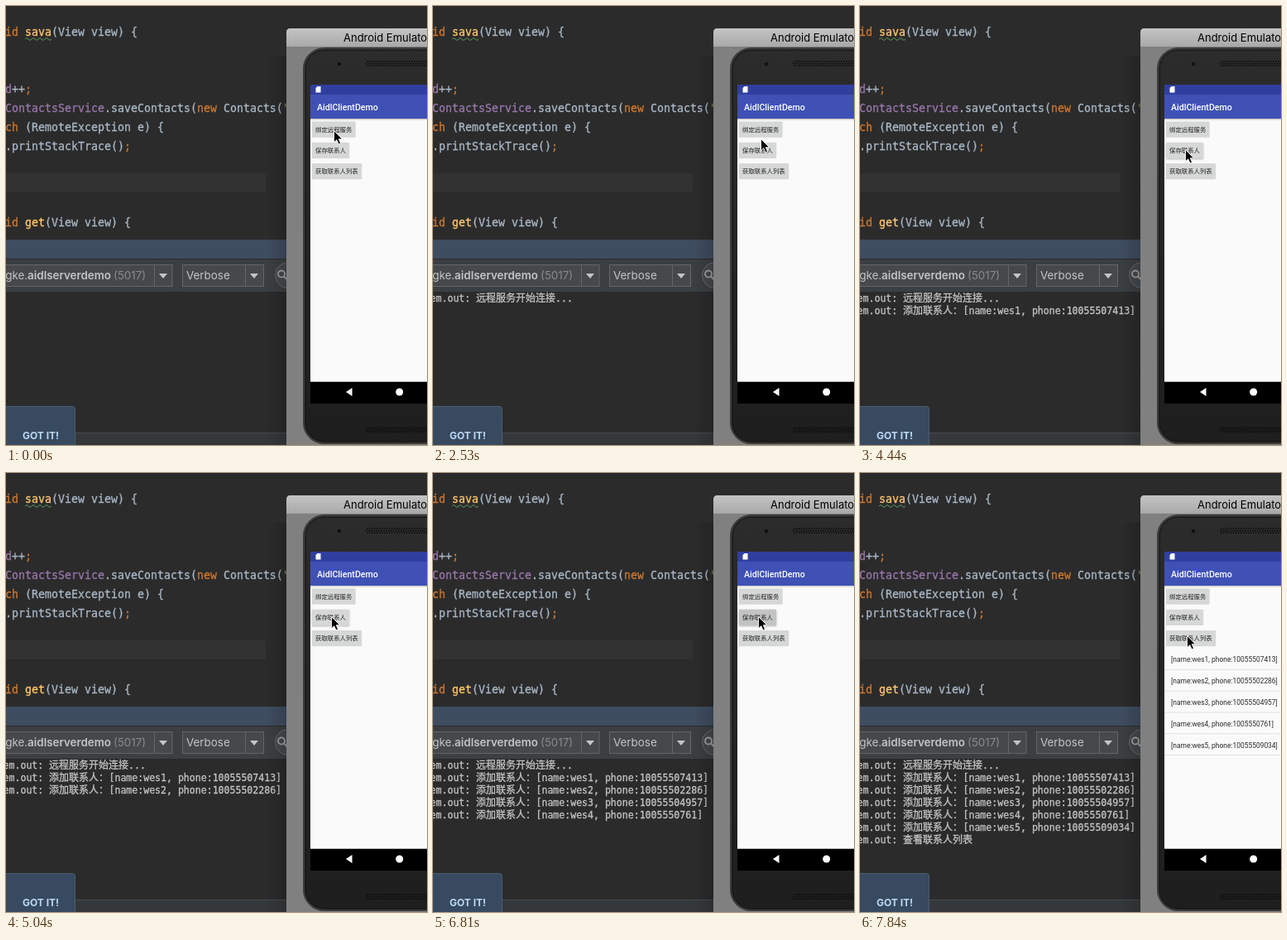
An HTML page for the animation above (8 s loop, 509 by 530 pixels).

```html
<!DOCTYPE html>
<html lang="zh">
<head>
<meta charset="utf-8">
<title>AIDL demo</title>
<style>
  html, body { margin: 0; width: 100%; height: 100%; overflow: hidden; background: #2b2b2b; }
  svg { display: block; width: 100%; height: 100%; }
  text { white-space: pre; }
  text, tspan { fill: currentColor; }
  .code, .log, .code tspan { stroke: currentColor; stroke-width: .3px; }
  .code { font: 13.29px "DejaVu Sans Mono", monospace; color: #a9b7c6; }
  .log { font: 11.55px "DejaVu Sans Mono", monospace; color: #c4c4c4; }
  .cjk { font: 12px "Noto Sans CJK SC", "Noto Sans CJK", sans-serif; }
  .ui { font: 13.4px Inter, sans-serif; color: #c4c4c4; }
  .package { font-weight: 600; }
  .app { font: 8.45px Roboto, sans-serif; color: #2a2a2a; }
  .button text { font: 500 7.4px "Noto Sans CJK SC", "Noto Sans CJK", sans-serif; color: #222; }
  .kw { color: #cc7832; }
  .fn { color: #ffc66d; }
  .field { color: #9876aa; }
  .string { color: #6a8759; }
  .box { fill: #45494b; stroke: #646769; }
</style>
</head>
<body>
<svg viewBox="0 0 509 530" preserveAspectRatio="none">
  <defs>
    <linearGradient id="titleBar" x2="0" y2="1">
      <stop stop-color="#c4c4c4"/><stop offset="1" stop-color="#a9a9a9"/>
    </linearGradient>
    <linearGradient id="phone" x2="0" y2="1">
      <stop stop-color="#2c2c2c"/><stop offset="1" stop-color="#1e1e1e"/>
    </linearGradient>
    <linearGradient id="shade">
      <stop stop-opacity="0"/><stop offset="1" stop-opacity=".16"/>
    </linearGradient>
    <filter id="lift" x="-20%" y="-40%" width="140%" height="190%">
      <feDropShadow dx="0" dy="1" stdDeviation="1.2" flood-opacity=".28"/>
    </filter>
  </defs>

  <!-- Editor -->
  <rect width="509" height="530" fill="#2b2b2b"/>
  <rect y="202" width="314" height="23" fill="#323232"/>
  <g class="code">
    <text x="-1" y="36"><tspan class="kw">id </tspan><tspan class="fn">sava</tspan>(View view) {</text>
    <text x="-1" y="105"><tspan class="field">d</tspan>++<tspan class="kw">;</tspan></text>
    <text x="-1" y="128"><tspan class="field">ContactsService</tspan>.saveContacts(<tspan class="kw">new</tspan> Contacts(<tspan class="string">"</tspan></text>
    <text x="-1" y="151"><tspan class="kw">ch</tspan> (RemoteException e) {</text>
    <text x="-1" y="174">.printStackTrace()<tspan class="kw">;</tspan></text>
    <text x="-1" y="266"><tspan class="kw">id </tspan><tspan class="fn">get</tspan>(View view) {</text>
  </g>
  <path d="M23 40q2 -3 4 0t4 0 4 0 4 0 4 0 4 0 4 0 4 0" fill="none" stroke="#5c9a5c"/>

  <!-- Log panel -->
  <rect y="282" width="340" height="23" fill="#3f4d60"/>
  <rect y="305" width="340" height="41" fill="#3c3f41"/>
  <path d="M0 281.5H340M0 305.5H340M0 345.5H340" stroke="#292b2d"/>
  <rect class="box" x="-5" y="312.5" width="206" height="26"/>
  <rect class="box" x="213.5" y="312.5" width="98" height="26"/>
  <path d="M179.5 313V338M289.5 313V338" stroke="#646769"/>
  <path d="M185 323h10l-5 6zM295 323h10l-5 6z" fill="#c4c4c4"/>
  <text class="ui" x="127" y="330" text-anchor="end">gke.<tspan class="package">aidlserverdemo</tspan></text>
  <text class="ui" x="130" y="330" style="color:#8a8a8a">(5017)</text>
  <text class="ui" x="218" y="330">Verbose</text>
  <rect class="box" x="325.5" y="309.5" width="60" height="31" rx="15.5"/>
  <circle cx="333" cy="323.5" r="4" fill="none" stroke="#a0a0a0" stroke-width="1.8"/>
  <path d="M336 326.5l4 4" stroke="#a0a0a0" stroke-width="2"/>
  <g id="log"></g>
  <rect y="515" width="340" height="15" fill="#35383a"/>
  <path d="M0 515.5H340" stroke="#484b4d"/>
  <rect x="-5" y="483.5" width="88.5" height="60" rx="3" fill="#374a5f" stroke="#4a5d70"/>
  <text x="20" y="523" style="font:700 12px Inter,sans-serif;color:#bcd9f6">GOT IT!</text>
  <rect x="314" y="60" width="25" height="470" fill="url(#shade)"/>

  <!-- Emulator window -->
  <path d="M339 530V32q0-5 5-5H509V530z" fill="#808080"/>
  <path d="M339 49V32q0-5 5-5H509V49z" fill="url(#titleBar)"/>
  <text x="408" y="43" style="font:13px Inter,sans-serif;color:#000">Android Emulator</text>
  <rect x="360" y="51" width="220" height="477" rx="25" fill="url(#phone)" stroke="#3c3c3c" stroke-width="2"/>
  <rect x="362.5" y="53.5" width="220" height="472" rx="22" fill="none" stroke="#181818"/>
  <circle cx="403" cy="70" r="2.5" fill="#0c0c0c" stroke="#2a2a2a"/>
  <path d="M436 67H509M435 69.5H509M436 72H509M436 509H509M435 511.5H509M436 514H509"
        stroke="#080808" stroke-width="1.5" stroke-dasharray="1.5 1.5"/>

  <!-- App -->
  <rect x="368" y="95" width="141" height="359" fill="#fafafa"/>
  <rect x="368" y="95" width="141" height="12" fill="#303f9f"/>
  <rect x="368" y="107" width="141" height="29" fill="#3f51b5"/>
  <rect x="368" y="136" width="141" height="1.5" opacity=".18"/>
  <path d="M376.5 97H380.5V104.5H374.5V99z" fill="#fff"/>
  <text x="376" y="126" style="font:500 10.6px Roboto,sans-serif;color:#fff">AidlClientDemo</text>
  <rect x="368" y="453.7" width="141" height="26.3"/>
  <path d="M411 466l7.5-5v10z" fill="#fff"/>
  <circle cx="475.7" cy="466" r="4.5" fill="#fff"/>
  <g id="buttons"></g>
  <g id="list"></g>
  <path id="cursor" d="M0 0V14.2L3.3 11.2 5.5 16.3 8 15.2 5.8 10.2H10.2Z" stroke="#fff" stroke-width=".9"/>
</svg>

<script>
const LOOP = 8000;
const $ = id => document.getElementById(id);

function add(parent, tag, attrs, content = '') {
  const node = document.createElementNS('http://www.w3.org/2000/svg', tag);
  for (const key in attrs) node.setAttribute(key, attrs[key]);
  node.textContent = content;
  return parent.appendChild(node);
}

const contacts = ['10055507413', '10055502286', '10055504957', '1005550761', '10055509034']
  .map((phone, i) => `[name:wes${i + 1}, phone:${phone}]`);

const messages = [
  { at: 440, label: '远程服务开始连接', tail: '...', x: 148 },
  ...[3260, 4590, 5330, 6080, 6960].map((at, i) =>
    ({ at, label: '添加联系人：', tail: contacts[i], x: 124.5 })),
  { at: 7400, label: '查看联系人列表', tail: '', x: 136 },
];
const logLines = messages.map(({ at, label, tail, x }, i) => {
  const y = 357 + 15 * i;
  const node = add($('log'), 'g', { class: 'log' });
  add(node, 'text', { x: -3.4, y }, 'em.out:');
  add(node, 'text', { x: 52, y, class: 'cjk' }, label);
  add(node, 'text', { x, y }, tail);
  return { at, node };
});

const buttons = [['绑定远程服务', 53], ['保存联系人', 45.5], ['获取联系人列表', 60.5]].map(([label, width], i) => {
  const y = 139.5 + 25.2 * i;
  const group = add($('buttons'), 'g', { class: 'button' });
  const face = add(group, 'rect', { x: 369.7, y, width, height: 19.3, rx: 1.2 });
  add(group, 'text', { x: 374, y: y + 12.4 }, label);
  return face;
});

contacts.forEach((contact, i) => {
  const y = 228.3 + 25.8 * i;
  add($('list'), 'text', { x: 376, y, class: 'app' }, contact);
  add($('list'), 'rect', { x: 368, y: y + 8.7, width: 141, height: 0.8, fill: '#dcdcdc' });
});

// Each press: button, raised from, darkened from, released
const presses = [
  [0, 150, 300, 590],
  [1, 2970, 3110, 3700],
  [1, 4440, 4590, 4740],
  [1, 5040, 5190, 5630],
  [1, 5930, 6080, 6220],
  [1, 6510, 6660, 6960],
  [2, 7250, 7400, 7840],
];

// The pointer jumps: time, x, y
const pointer = [
  [0, 396.5, 150.5], [590, 396.5, 155], [740, 396.5, 160.5],
  [2680, 395.5, 166], [2820, 393.5, 173.5],
  [7100, 394.5, 184], [7250, 395.5, 196.5],
];

const show = (node, visible) => node.setAttribute('visibility', visible ? 'visible' : 'hidden');

function render(t) {
  logLines.forEach(({ at, node }) => show(node, t >= at));
  show($('list'), t >= 7400);
  buttons.forEach((face, i) => {
    const press = presses.find(([button, start, , end]) => button === i && t >= start && t < end);
    face.setAttribute('fill', press && t >= press[2] ? '#c2c3c3' : '#d6d7d7');
    face.setAttribute('filter', press ? 'url(#lift)' : 'none');
  });
  const [, x, y] = pointer.filter(([at]) => t >= at).pop();
  $('cursor').setAttribute('transform', `translate(${x} ${y})`);
}

const startTime = performance.now();
function tick() {
  render((performance.now() - startTime) % LOOP);
  requestAnimationFrame(tick);
}
tick();
</script>
</body>
</html>
```
